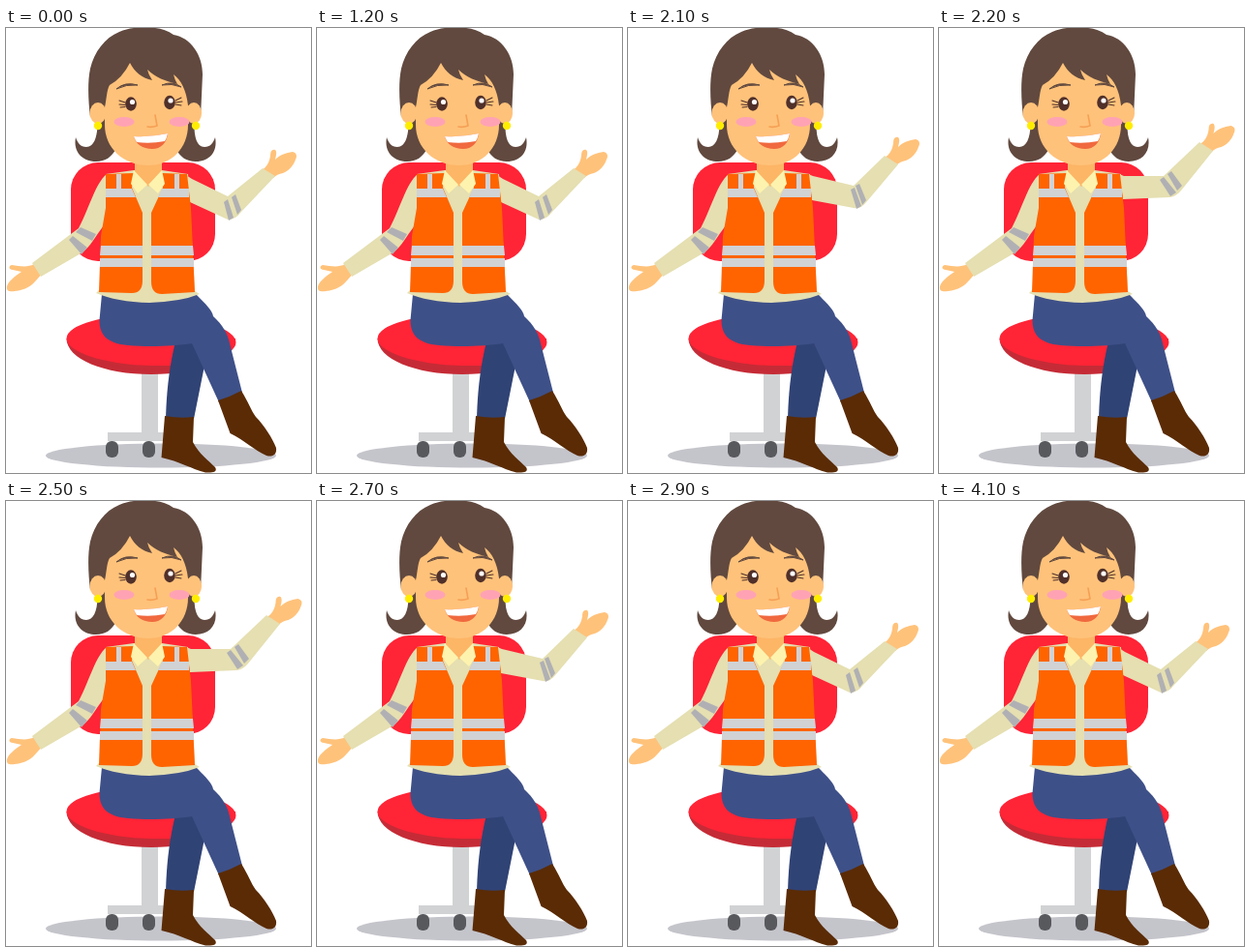
These frames come from a looping animation (315x460 px, 4.9 s). An HTML page:

```html
<!DOCTYPE html>
<html lang="en">
<head>
<meta charset="utf-8">
<title>Worker on a chair</title>
<style>
html, body { margin: 0; width: 100%; height: 100%; overflow: hidden; background: #fff; }
svg { display: block; width: 100vw; height: 100vh; }
.hair { fill: #61493f; }
.skin { fill: #ffc27a; }
.shirt { fill: #e5dfb1; }
.vest { fill: #ff6400; }
.tape { fill: #d1d2d4; }
.cuff { fill: #b0b0b4; }
.red { fill: #ff2436; }
.jeans { fill: #3e5088; }
.boot { fill: #5a2b05; }
.lash { fill: none; stroke: #50302a; stroke-linecap: round; stroke-width: 1.1; }
.brow { fill: #61493f; }
/* the arm holds four poses on the way up and down */
.pose { visibility: hidden; animation: 4.9s step-end infinite; }
.low { animation-name: low; }
.mid { animation-name: mid; }
.high { animation-name: high; }
.top { animation-name: top; }
@keyframes low {
  0%, 59.1837% { visibility: visible; }
  40.8163% { visibility: hidden; }
  100% { visibility: visible; }
}
@keyframes mid {
  0%, 42.8571%, 59.1837%, 100% { visibility: hidden; }
  40.8163%, 57.1429% { visibility: visible; }
}
@keyframes high {
  0%, 44.898%, 57.1429%, 100% { visibility: hidden; }
  42.8571%, 55.102% { visibility: visible; }
}
@keyframes top {
  0%, 55.102%, 100% { visibility: hidden; }
  44.898% { visibility: visible; }
}
</style>
</head>
<body>
<svg viewBox="0 0 315 460" preserveAspectRatio="none">
  <defs>
    <path id="hand" class="skin" d="M264 147C269 144 272 139 273 132C273 127 275 125 278 126C280 128 279 132 278 136C283 131 289 129 296 128C300 129 301 132 299 136C297 142 292 148 286 150Q280 151 276 155Z"/>
  </defs>

  <!-- chair -->
  <ellipse cx="160" cy="442" rx="119" ry="12.5" fill="#c4c4cb"/>
  <path class="tape" d="M140 350H157V418H182V427H105V418H140Z"/>
  <g fill="#58595d">
    <rect x="103" y="427" width="13" height="17" rx="6"/>
    <rect x="141" y="427" width="13" height="17" rx="6"/>
  </g>
  <path fill="#c52b36" d="M62.5 321C62.5 342 101 358 150 358S237 342 237 321Z"/>
  <ellipse class="red" cx="150" cy="323" rx="87.5" ry="26" transform="rotate(1.5 150 323)"/>
  <rect class="red" x="67" y="139" width="149" height="102" rx="28"/>

  <!-- legs -->
  <path fill="#304375" d="M176 320C170 344 166 368 165 404H194L206 344L196 322Z"/>
  <path class="boot" d="M164 401Q180 404 194 402L193 428C199 440 210 448 216 454C219 459 213 460 206 459.5C192 456 179 448 160.5 444Z"/>
  <path class="jeans" d="M99 275H196C207 286 213 292 214 298C224 307 229 316 231 326L244 377Q232 383 220 387L192 326C174 329 147 330 126 328C104 326 96.5 317 96.5 302Z"/>
  <path class="boot" d="M219 385Q232 381 243 375C250 386 253 395 258 402C267 411 275 424 279 434C280 441 275 444 269 442C257 437 246 426 231.5 419Z"/>

  <!-- left arm -->
  <path class="skin" d="M29 244C22 248 14 246 6 245C2 246 3 250 7 250L16 252C9 257 3 261 1 267C0 272 4 273 9 272C20 271 27 266 31 261L38 253Z"/>
  <path class="shirt" d="M104 151C92 161 87 184 75 207L27 243L36 257L79 232C87 226 92 216 101 204Z"/>
  <path class="cuff" d="M77 206L93 213L89 220L72 211ZM69 215L84 227L78 234L65 219Z"/>

  <!-- right arm -->
  <g class="pose low">
    <use href="#hand"/>
    <path class="shirt" d="M186 152L192 156L229 174L265 145L278 153L243 190Q236 199 229 198L190 180Z"/>
    <path class="cuff" d="M225 180L229 177L235 196L230 199ZM233 175L237 172L243 188L239 193Z"/>
  </g>
  <g class="pose mid">
    <use href="#hand" transform="translate(3 -4.5)"/>
    <path class="shirt" d="M186 152L191 155L231 171L266 141L280 150L244 186Q238 193 231 192L190 178Z"/>
    <path class="cuff" d="M228 173L231 170L238 189L234 192ZM234 168L238 166L244 183L240 188Z"/>
  </g>
  <g class="pose high">
    <use href="#hand" transform="translate(1 -13)"/>
    <path class="shirt" d="M186 151L191 153L233 163L265 132L279 141L247 179Q240 188 233 186L190 178Z"/>
    <path class="cuff" d="M230 167L234 165L241 184L236 187ZM235 163L239 161L246 178L242 183Z"/>
  </g>
  <g class="pose top">
    <use href="#hand" transform="translate(5.5 -27)"/>
    <path class="shirt" d="M186 151L191 153L232 153L269 118L283 127L250 168Q244 175 238 175L190 177Z"/>
    <path class="cuff" d="M228 157L232 154L245 170L239 174ZM236 151L240 148L251 163L246 168Z"/>
  </g>

  <!-- curled ends of the hair -->
  <path class="hair" d="M94 90C96 112 91 123 83 123C77 123 74 119 72 113C69 128 79 138 93 138C103 138 109 133 113 126L120 95H170L176 126C180 133 186 138 196 138C210 138 219 128 216 113C214 119 211 123 205 123C197 123 193 112 195 90Z"/>

  <!-- torso -->
  <path class="shirt" d="M103 151L132 147H161L188 151L195 272L200 275Q180 283 148 284Q114 283 93 274L97 270Z"/>
  <path class="vest" d="M103 151L132 150L130 165L141 191V261Q141 274 130 274L96 273L98 215L103 186ZM161 150L187 151L191 186L195 273L161 275Q150 275 150 262V191L162 165Z"/>
  <path class="tape" d="M114 151H119V166H130L134 175H103V166H114ZM174 151H179V166H189V175H157L161 166H174Z"/>
  <path class="tape" d="M98 225H141V235H97ZM97 238H141V247H97ZM150 225H193L194 235H150ZM150 238H194V247H150Z"/>

  <!-- neck and collar -->
  <path fill="#fdb566" d="M133 130H161V150L147 164L133 150Z"/>
  <path fill="#fdf3ae" d="M132 147L146 162L136 171L129 161ZM161 147L147 162L157 171L164 161Z"/>

  <!-- head -->
  <path class="hair" d="M87 92C85 76 84 56 87 42C91 25 102 10 117 4C126 0 136 -1 145 0C154 -1 165 1 173 7C191 10 203 28 203 48L201 92Z"/>
  <g class="skin">
    <ellipse cx="95" cy="88" rx="8.5" ry="11"/>
    <ellipse cx="194" cy="88" rx="8" ry="11"/>
    <path d="M102 82C104 73 104 64 107 59Q120 52 128 36C133 46 141 52 151 54Q147 48 146 43C154 51 165 55 177 58Q174 53 173 48C181 54 186 64 188 80V100C188 124 171 142 147 142C121 142 102 124 102 100Z"/>
  </g>
  <g fill="#ffed00">
    <circle cx="95" cy="101" r="4.2"/>
    <circle cx="196" cy="101" r="4.2"/>
  </g>

  <!-- face -->
  <g fill="#ffa3b4">
    <ellipse cx="122" cy="97" rx="10.5" ry="5"/>
    <ellipse cx="179" cy="97" rx="10.5" ry="5"/>
  </g>
  <g fill="#50302a">
    <ellipse cx="129" cy="78.5" rx="5.8" ry="7.2"/>
    <ellipse cx="169" cy="77" rx="5.8" ry="7.2"/>
  </g>
  <g fill="#fff">
    <circle cx="130.5" cy="76.5" r="2.6"/>
    <circle cx="170" cy="75" r="2.6"/>
  </g>
  <path class="lash" d="M117 75L123 77M117 79L123 79.5M118 82L123 81.5M175 75L181 72M175 77L182 76M175 79L181 80"/>
  <path class="brow" d="M114 63Q123 55 136 59Q124 58 114 63ZM161 59Q172 54 181 61Q171 57 161 59Z" stroke="#61493f"/>
  <path fill="none" stroke="#f5a055" stroke-width="1.6" stroke-linecap="round" d="M154 90L156 101Q151 103 146 102"/>
  <path fill="#f0693f" d="M132 112Q150 113 167 109C166 119 160 125 151 125C141 125 134 120 132 112Z"/>
  <path fill="#fff" d="M132 112Q150 113 167 109Q166 114 164 117Q149 120 135 118Q133 115 132 112Z"/>
</svg>
</body>
</html>
```
